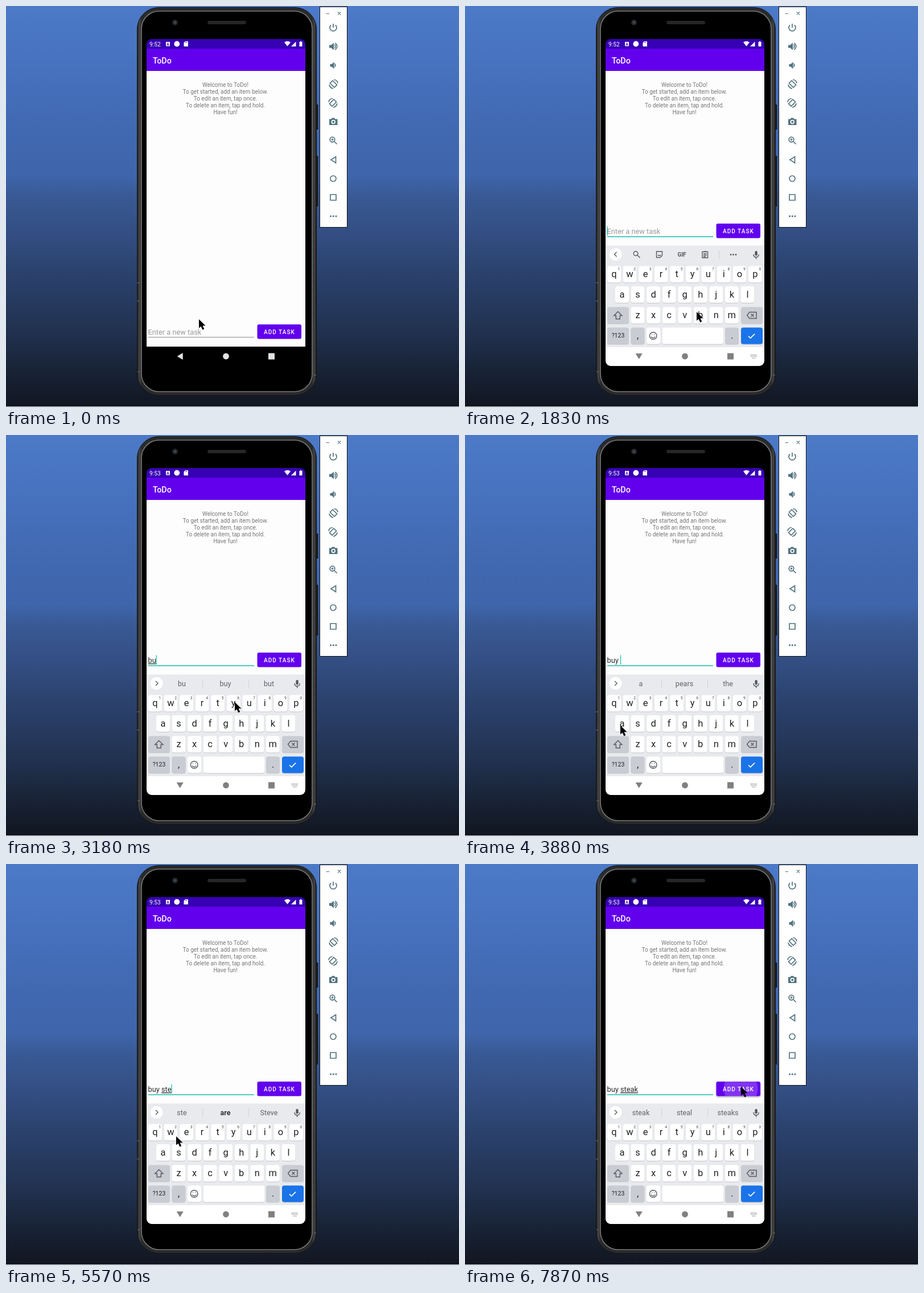
Write an HTML page that moves like this. It is 796 by 704 pixels and loops after 7.99 s.

```html
<!DOCTYPE html>
<html lang="en">
<head>
<meta charset="utf-8">
<title>ToDo demo</title>
<style>
html, body { margin: 0; width: 100%; height: 100%; overflow: hidden; background: #121722; }
svg { display: block; width: 796px; height: 704px; font-family: Roboto, sans-serif; }
text { white-space: pre; }
.mid { text-anchor: middle; }
.line { fill: none; stroke: #52737f; stroke-width: 1.7; }
.fill { fill: #52737f; }
.tool { fill: none; stroke: #55595e; stroke-width: 1.4; }
.white { fill: #fff; }
</style>
</head>
<body>
<svg viewBox="0 0 796 704">
  <defs>
    <linearGradient id="sky" x2="0" y2="1">
      <stop offset="0" stop-color="#4c7ac8"/>
      <stop offset=".2" stop-color="#456fba"/>
      <stop offset=".33" stop-color="#4068b0"/>
      <stop offset=".42" stop-color="#3f66ac"/>
      <stop offset=".47" stop-color="#395a96"/>
      <stop offset=".55" stop-color="#345086"/>
      <stop offset=".68" stop-color="#2a406a"/>
      <stop offset=".8" stop-color="#223352"/>
      <stop offset=".9" stop-color="#192438"/>
      <stop offset="1" stop-color="#111620"/>
    </linearGradient>
    <linearGradient id="rim">
      <stop offset="0" stop-color="#1b1b1b"/>
      <stop offset=".012" stop-color="#454545"/>
      <stop offset=".025" stop-color="#2a2a2a"/>
      <stop offset=".975" stop-color="#2a2a2a"/>
      <stop offset=".988" stop-color="#454545"/>
      <stop offset="1" stop-color="#1b1b1b"/>
    </linearGradient>
    <clipPath id="screen"><rect x="247" y="58" width="279" height="574" rx="9"/></clipPath>
    <clipPath id="buttonBox"><rect x="441.5" y="559" width="77.5" height="25.5" rx="3"/></clipPath>
    <filter id="shade" x="-20%" y="-20%" width="140%" height="150%">
      <feDropShadow dx="0" dy="1.5" stdDeviation="1.5" flood-opacity=".35"/>
    </filter>
  </defs>

  <rect width="796" height="704" fill="url(#sky)"/>
  <path d="M0 703.5H796" stroke="#c9ced6"/>

  <!-- phone -->
  <path d="M546.5 173V217M546.5 263V352" stroke="#1c1c20" stroke-width="4"/>
  <rect x="230.5" y="2.5" width="315" height="681" rx="38" fill="url(#rim)" stroke="#131313"/>
  <rect x="238" y="9" width="300" height="668" rx="31" stroke="#77797c" stroke-width="1.6"/>
  <path d="M230 486H234M230 518H234M541 648H545M231 642H235" stroke="#777"/>
  <circle cx="297" cy="29" r="5" fill="#23262b"/>
  <circle cx="297" cy="29" r="2.4" fill="#3d4653"/>
  <rect x="354" y="26" width="68" height="6" rx="3" fill="#262626"/>

  <g clip-path="url(#screen)">
    <path d="M247 58h279v17H247z" fill="#3700b3"/>
    <path d="M247 75h279v39H247z" fill="#6200ee"/>
    <path d="M247 114h279v484H247z" fill="#fdfdfd"/>
    <g class="white">
      <text id="clock" x="252" y="70.5" font-size="10.2"></text>
      <rect x="281" y="63" width="7" height="7.5"/>
      <circle cx="300.3" cy="66.5" r="4.9"/>
      <path d="M315 62h5v9h-7.5v-6.5zM489 63.8q5.5-4 11 0l-5.5 7zM501 71h8.5v-8.5zM515.5 63h1.5v-1h2v1h1.5v8h-5z"/>
      <text x="258" y="101" font-size="14.3" font-weight="500">ToDo</text>
    </g>
    <path d="M282.7 69.5l1.8-5 1.8 5M283.4 68h2.2" stroke="#3700b3" fill="none"/>
    <path d="M315.5 63v2M317.5 63v2" stroke="#3700b3" stroke-width=".8"/>
    <g id="welcome" class="mid" font-size="10" fill="#757575"></g>

    <g id="entry">
      <path id="rule"/>
      <text id="field" x="249.5" y="577" font-size="12.8"></text>
      <path id="caret" stroke="#16bfae" stroke-width="1.3"/>
      <rect id="button" x="441.5" y="559" width="77.5" height="25.5" rx="3" fill="#6200ee" filter="url(#shade)"/>
      <circle id="ripple" cx="484.5" cy="571.5" r="30" fill="#fff" opacity=".2" clip-path="url(#buttonBox)"/>
      <text x="453" y="575.7" class="white" font-size="10.1" font-weight="500" letter-spacing="1">ADD TASK</text>
    </g>

    <path id="navBar" d="M247 598h279v34H247z"/>
    <g id="keyboard">
      <path d="M247 420.5h279V599H247z" fill="#e8eaed"/>
      <circle cx="264.5" cy="436" r="11" class="white"/>
      <path id="chevron" class="tool"/>
      <rect x="509.4" y="430" width="4.4" height="8.5" rx="2.2" fill="#55595e"/>
      <path class="tool" d="M507 436q0 5 4.6 5t4.6-5M511.6 441v3.3"/>
      <g id="tools">
        <g class="tool">
          <circle cx="300" cy="434.5" r="3.8"/><path d="M303 437.5l4.5 4.5"/>
          <path d="M336.5 431h10v7l-3.5 3.5h-6.5zM339 437q2.5 2.5 5 0M339.5 434h.1M343.5 434h.1"/>
          <path d="M417 431.500h9.500v10.500H417zM419.500 431h4.500M419 435h5.500M419 437.500h5.500M419 440h4"/>
        </g>
        <path d="M446.500 429v15" stroke="#d0d3d7"/>
        <text x="381" y="440" class="mid" font-size="10" font-weight="700" fill="#55595e">GIF</text>
        <path d="M467 436.500h.01M471.500 436.500h.01M476 436.500h.01" stroke="#55595e" stroke-width="2.8" stroke-linecap="round"/>
      </g>
      <g id="hints" class="mid" font-size="12.6" fill="#5f6368"></g>
      <g id="keys" class="mid"></g>
      <g class="tool" stroke="#3c4043">
        <path d="M268.800 536.500l7 7h-3.500v6h-7v-6h-3.500z"/>
        <path d="M500 537.500h12v11h-12l-4.500-5.500zM502.500 540.500l5 5M507.500 540.500l-5 5"/>
        <circle cx="330.700" cy="579" r="6.300"/>
        <path d="M327.500 581q3.200 3.500 6.400 0M328.500 577h.1M332.800 577h.1" stroke-linecap="round"/>
      </g>
      <path d="M498 579.500l3.600 3.600 7.500-7.500" fill="none" stroke="#fff" stroke-width="1.700"/>
    </g>
    <g id="nav">
      <path id="back" d="M-5 0L5 -6V6Z"/>
      <circle cx="386.500" cy="615" r="5.400"/>
      <path d="M461 609.500h11v11h-11z"/>
      <path id="switcher" d="M502 612.500h11M502 615h11M504.500 618h6" stroke="#8a8a8a" stroke-width="1.300" stroke-dasharray="1.300 1"/>
    </g>
    <g id="popup" class="mid">
      <rect width="27" height="80" rx="3" fill="#c9ccd2" filter="url(#shade)"/>
      <text id="popKey" x="13.500" y="27" font-size="18"></text>
      <text id="popDots" x="20.500" y="37" font-size="9" fill="#444">...</text>
    </g>
  </g>

  <!-- emulator controls -->
  <rect x="551.500" y="1.500" width="48" height="387" fill="#fff" stroke="#111"/>
  <path class="line" style="stroke-width:1.100" d="M562.500 13.500h5.500M583 10.500l5 5M588 10.500l-5 5"/>
  <g class="line">
    <path d="M571 33.500a6 6 0 1 0 8 0M575 31v7"/>
    <path d="M577.500 67.500q2.500 3.500 0 7M578.500 64.800q6.500 6.200 0 12.400M577.500 101q2.500 3 0 6"/>
    <path d="M574 131l7.500 7.500-4.500 4.500-7.500-7.500zM568 138q1 6 7 7M576 129.500q6 0 7 6"/>
    <path d="M576 164l-7.500 7.500 4.500 4.500 7.500-7.500zM582 171q-1 6-7 7M574 162.500q-6 0-7 6"/>
    <circle cx="573.500" cy="234.500" r="4.300"/><path d="M577 238l4.500 4.500M571.500 234.500h4M573.500 232.500v4"/>
    <path d="M571 270l8.500-5.500v11z"/>
    <circle cx="575" cy="303" r="5"/>
    <path d="M570 331h10v10h-10z"/>
  </g>
  <g class="fill">
    <path d="M568 68.500h3.500l4.500-4v13l-4.500-4H568zM569.500 102h3l4-4v12.500l-4-4h-3z"/>
    <path fill-rule="evenodd" d="M568 198.500h3.500l1.500-2h4l1.500 2h4V209h-14.500zM571.500 203.500a3.700 3.700 0 1 0 7.400 0a3.700 3.700 0 1 0-7.400 0"/>
    <circle cx="575.200" cy="203.500" r="2"/>
    <circle cx="570.500" cy="369" r="1.600"/><circle cx="575.200" cy="369" r="1.600"/><circle cx="580" cy="369" r="1.600"/>
  </g>

  <path id="pointer" d="M0 0V15.500L3.500 12.500L6.500 18.500L9.300 17L6.500 11.300H11.500Z"/>
</svg>
<script>
const $ = id => document.getElementById(id);
const set = (id, attrs) => { for (const k in attrs) $(id).setAttribute(k, attrs[k]); };
const show = (id, on) => set(id, { display: on ? 'inline' : 'none' });

$('welcome').innerHTML = ['Welcome to ToDo!', 'To get started, add an item below.', 'To edit an item, tap once.',
  'To delete an item, tap and hold.', 'Have fun!']
  .map((s, i) => `<text x="385.5" y="${142 + 12 * i}">${s}</text>`).join('');

// Keyboard layout; keyBox remembers where each key sits for its popup.
const keyBox = {};
function key(x, y, w, label = '', size = 16.5, fill = '#fff') {
  keyBox[label] = { x, y, w };
  return `<rect x="${x}" y="${y + 1}" width="${w}" height="29" rx="4" fill="#c3c6cb"/>
    <rect x="${x}" y="${y}" width="${w}" height="29" rx="4" fill="${fill}"/>
    <text x="${x + w / 2}" y="${y + 14 + size * .34}" font-size="${size}" fill="#202124">${label}</text>`;
}
const gray = '#c9ccd2';
let keys = '';
[['qwertyuiop', 250, 456.5], ['asdfghjkl', 264, 492], ['zxcvbnm', 291.5, 528.5]].forEach(([row, x0, y], r) =>
  [...row].forEach((c, i) => {
    const x = x0 + 27.55 * i;
    keys += key(x, y, 24, c);
    if (!r) keys += `<text x="${x + 20.5}" y="464" font-size="6.8" fill="#44474b">${(i + 1) % 10}</text>`;
  }));
keys += key(250, 528.5, 38, '', 16, gray) + key(485, 528.5, 38, '', 16, gray) +
  key(250, 564.5, 38, '?123', 10.5, gray) + key(291.5, 564.5, 24, ',', 16, gray) +
  key(319, 564.5, 24) + key(346.500, 564.5, 107.5) + key(457, 564.5, 24, '.', 16, gray) +
  key(485, 564.5, 38, '', 16, '#1a73e8');
$('keys').innerHTML = keys;

const starts = [0];
[[160, 950, 7], [1100, 1100, 1], [1250, 2220, 8], [2360, 3330, 8], [3450, 4430, 8],
 [4570, 5570, 8], [5720, 6680, 8], [6830, 7590, 7], [7870, 7870, 1]].forEach(([a, b, n]) => {
  for (let i = 0; i < n; i++) starts.push(n > 1 ? a + (b - a) * i / (n - 1) : a);
});
const LOOP = 7990;

// Pointer positions: [step, x, y]
const path = [[0, 339, 550], [3, 313, 570], [5, 311, 570], [7, 311, 568], [8, 323, 543], [10, 365, 536], [13, 407, 537],
  [15, 412, 539], [16, 414, 516], [17, 421, 485], [19, 426, 466], [20, 425, 466], [22, 402, 469], [24, 398, 471],
  [26, 383, 576], [27, 330, 550], [28, 273, 510], [29, 273, 509], [31, 299, 506], [32, 301, 505], [35, 369, 467],
  [36, 366, 467], [38, 317, 470], [39, 312, 472], [40, 299, 478], [42, 273, 508], [43, 278, 508], [46, 505, 505],
  [47, 498, 505], [49, 473, 506], [50, 476, 500], [54, 486, 393], [55, 485, 391], [57, 485, 391]];

// Key presses by step, and what the field and hints show from a step on.
const presses = { 15: 'b', 19: 'u', 23: 'y', 31: 's', 35: 't', 38: 'e', 42: 'a', 49: 'k' };
const typed = [[5, ''], [16, 'b', 'b', 'buy', 'but'], [20, 'bu', 'bu', 'buy', 'but'], [24, 'buy', 'buy', 'but', 'buying'],
  [27, 'buy ', 'a', 'pears', 'the'], [32, 'buy s', 's', 'some', 'so'], [36, 'buy st', 'st', 'at', 'something'],
  [39, 'buy ste', 'ste', '*are', 'Steve'], [43, 'buy stea', 'stea', '*steak', 'area'], [50, 'buy steak', 'steak', 'steal', 'steaks']];
const slide = { 5: 150, 6: 45, 7: 8 };
const turn = { 5: 0, 6: -12, 7: -45 };

function pointerAt(step) {
  const i = Math.max(1, path.findIndex(p => p[0] >= step));
  const [a, x, y] = path[i - 1], [b, x2, y2] = path[i];
  const k = (step - a) / (b - a);
  return [x + (x2 - x) * k, y + (y2 - y) * k];
}

function drawEntry(open, step, t) {
  const [since, value, ...hints] = typed.filter(s => s[0] <= step).pop() || [0, ''];
  const cut = value.lastIndexOf(' ') + 1;
  set('entry', { transform: `translate(0 ${open ? -177 : 0})` });
  set('rule', { d: `M250 ${open ? 582 : 581.5}H436`, stroke: open ? '#16bfae' : '#8b8b8b', 'stroke-width': open ? 1.5 : 1 });
  set('field', { fill: value ? '#2b2b2b' : '#9a9a9a' });
  $('field').innerHTML = value
    ? value.slice(0, cut) + `<tspan text-decoration="underline">${value.slice(cut)}</tspan>`
    : 'Enter a new task';
  const x = 250 + (value ? $('field').getComputedTextLength() : 0);
  set('caret', { d: `M${x} 563.5V580` });
  show('caret', open && (t - starts[since]) % 1000 < 500);
  show('tools', !hints.length);
  set('chevron', { d: hints.length ? 'M263 432l4 4-4 4' : 'M266.5 432l-4 4 4 4' });
  $('hints').innerHTML = hints.length ? '<path d="M345.500 429v15M426.500 429v15" stroke="#d0d3d7"/>' + hints.map((h, i) =>
    `<text x="${309 + 76.5 * i}" y="441.3"${h[0] == '*' ? ' font-weight="700" fill="#333"' : ''}>${h.replace('*', '')}</text>`).join('') : '';
}

function draw(step) {
  const open = step >= 5, pressed = presses[step], tap = step >= starts.length - 1;
  $('clock').textContent = step < 22 ? '9:52' : '9:53';
  drawEntry(open, step, starts[step]);
  show('keyboard', open);
  show('switcher', open);
  set('keyboard', { transform: `translate(0 ${slide[step] || 0})` });
  set('navBar', { fill: open ? '#fff' : '#000' });
  set('nav', { fill: open ? '#808080' : '#e2e2e2' });
  set('back', { transform: `translate(305.7 615) rotate(${open ? turn[step] ?? -90 : 0})` });
  show('popup', pressed);
  if (pressed) {
    const { x, y } = keyBox[pressed];
    set('popup', { transform: `translate(${x - 1.5} ${y - 50.5})` });
    $('popKey').textContent = pressed;
    show('popDots', !'kb'.includes(pressed));
  }
  show('ripple', tap);
  set('button', { filter: tap ? 'url(#shade)' : 'none' });
  set('pointer', { transform: `translate(${pointerAt(step)})` });
}

let shown = -1;
function tick(now) {
  const t = now % LOOP;
  const step = starts.filter(s => s <= t + .5).length - 1;
  if (step !== shown) draw(shown = step);
  requestAnimationFrame(tick);
}
draw(0);
requestAnimationFrame(tick);
</script>
</body>
</html>
```
